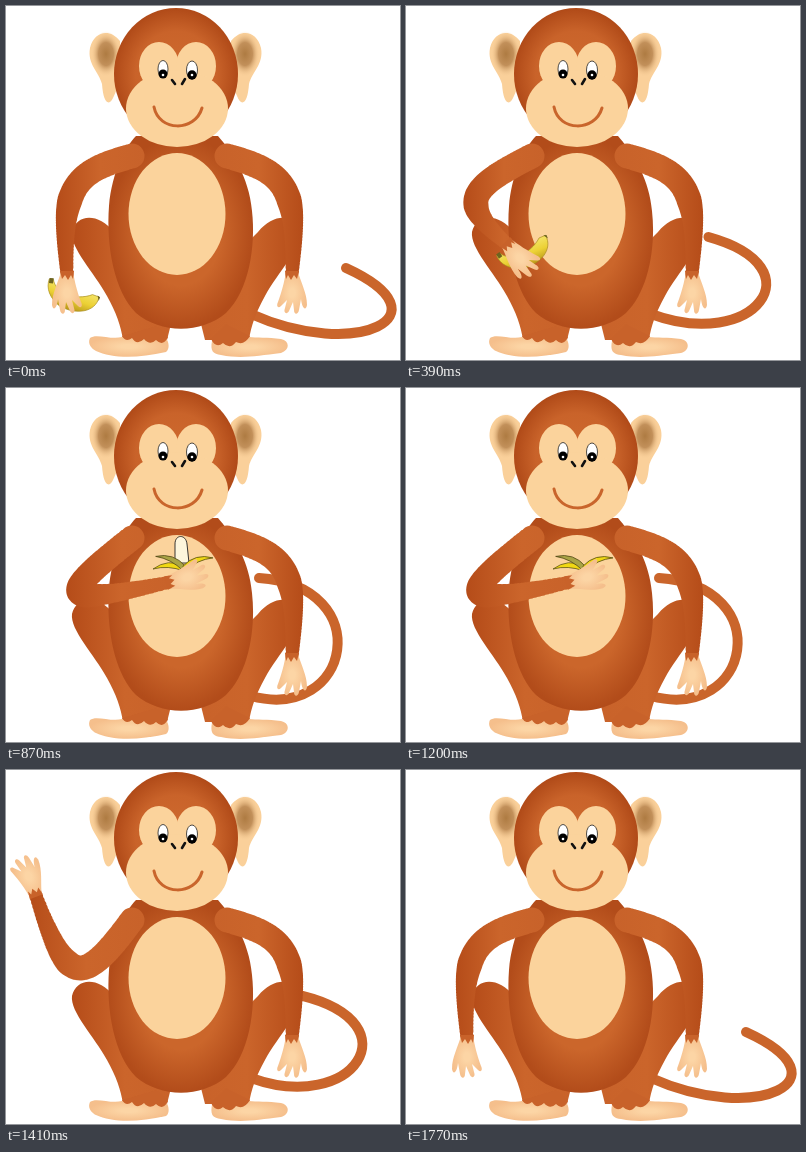
These frames come from a looping animation (394x354 px, 2.04 s). An HTML page:

```html
<!DOCTYPE html>
<html lang="en">
<head>
<meta charset="utf-8">
<title>Monkey with banana</title>
<style>
html, body { margin: 0; width: 100%; height: 100%; overflow: hidden; background: #fff; }
svg { display: block; width: 394px; height: 354px; }
</style>
</head>
<body>
<svg viewBox="0 0 394 354">
  <defs>
    <radialGradient id="fur"><stop offset="0" stop-color="#cf6b2f"/><stop offset=".65" stop-color="#c9632a"/><stop offset="1" stop-color="#b04a18"/></radialGradient>
    <radialGradient id="body"><stop offset=".55" stop-color="#cb662b"/><stop offset="1" stop-color="#b24c1a"/></radialGradient>
    <linearGradient id="limb"><stop offset="0" stop-color="#b54c19"/><stop offset=".5" stop-color="#cb652b"/><stop offset="1" stop-color="#c8622a"/></linearGradient>
    <radialGradient id="skin"><stop offset=".2" stop-color="#fcd5a5"/><stop offset="1" stop-color="#f5bf8c"/></radialGradient>
    <radialGradient id="inner"><stop offset="0" stop-color="#ae7b42"/><stop offset=".5" stop-color="#c2905a"/><stop offset="1" stop-color="#fad09a" stop-opacity="0"/></radialGradient>
    <linearGradient id="yellow" x2="0" y2="1"><stop offset="0" stop-color="#f4e468"/><stop offset=".5" stop-color="#ecd135"/><stop offset="1" stop-color="#b99718"/></linearGradient>
    <g id="ear">
      <path d="M114 35C104 22 88 25 84 42C81 58 93 66 96 78C97 92 100 98 104 96C108 93 109 85 114 78Z" fill="#fad09a"/>
      <ellipse cx="100" cy="48" rx="15" ry="23" fill="url(#inner)"/>
    </g>
    <path id="leg" d="M108 226C92 206 70 208 66 226C64 242 88 266 101 290C110 306 115 320 117 334L161 334L172 290Z" fill="url(#limb)"/>
    <g id="hand">
      <path d="M-6-3C-9 8-15 18-15 30C-14 36-10 34-9 24L-7 35C-6 40-2 40-2 35L-1 27L3 36C5 40 9 38 7 33L5 25L11 31C14 34 16 31 14 27C10 16 8 8 6-3Z" fill="url(#skin)"/>
      <path d="M-7-4L-5 4L-2 0L1 5L4 0L6 4L7-4Z" fill="#c8622a"/>
    </g>
    <path id="flap" d="M0-3Q16-11 31 0Q16-4 0 2Z"/>
  </defs>

  <path id="tail" fill="none" stroke="#ca652b" stroke-width="10" stroke-linecap="round"/>
  <use href="#leg"/>
  <use href="#leg" transform="translate(360) scale(-1 1)"/>
  <path d="M116 331C105 334 90 327 84 332C81 338 86 343 90 345C105 352 130 353 160 346C164 343 163 336 160 332Z" fill="url(#skin)"/>
  <path d="M206 335C204 345 207 348 215 349C235 353 250 350 275 347C284 344 284 335 275 333C262 331 250 332 243 331Z" fill="url(#skin)"/>
  <path d="M116 330Q120 337 126 332Q131 340 138 333Q144 340 150 334Q157 341 162 331L150 320ZM205 333Q210 343 217 337Q224 344 230 336Q238 340 244 330L220 318Z" fill="#c8622a"/>

  <path d="M130 130C120 140 106 165 103 200C100 240 108 285 130 307C155 328 195 328 220 307C243 285 250 240 246 205C243 170 225 145 212 130Z" fill="url(#body)"/>
  <ellipse cx="171" cy="208" rx="48.5" ry="61" fill="#fbd39c"/>
  <g transform="translate(347) scale(-1 1)">
    <path id="stillArm" fill="url(#limb)"/>
    <use href="#hand" id="stillHand"/>
  </g>

  <use href="#ear"/>
  <use href="#ear" transform="translate(339) scale(-1 1)"/>
  <ellipse cx="170" cy="68" rx="62" ry="66" fill="url(#fur)"/>
  <g fill="#fbd39c">
    <ellipse cx="153" cy="60" rx="20" ry="24"/>
    <ellipse cx="190" cy="60" rx="20" ry="24"/>
    <ellipse cx="171" cy="102.5" rx="51" ry="38.5"/>
  </g>
  <g fill="#fff" stroke="#222" stroke-width=".8">
    <ellipse cx="157" cy="63" rx="5" ry="8.5"/>
    <ellipse cx="186" cy="64" rx="5.5" ry="9"/>
  </g>
  <circle cx="157" cy="68" r="4.5"/><circle cx="186" cy="69" r="4.7"/>
  <circle cx="157" cy="69" r="1.3" fill="#fff"/><circle cx="186" cy="69" r="1.3" fill="#fff"/>
  <path d="M166 74L169 78M179 73L176 78" stroke="#111" stroke-width="2.6" stroke-linecap="round"/>
  <path d="M148 101C153 126 189 126 196 102" fill="none" stroke="#c9652c" stroke-width="3" stroke-linecap="round"/>

  <path id="fruit" d="M169 175V156C169 146 180 146 181 156L183 175Z" fill="#fdf6dc" stroke="#222" stroke-width=".9"/>
  <g id="peel" stroke="#4d4512" stroke-width=".7" stroke-linejoin="round">
    <use href="#flap" fill="#f0d813"/>
    <use href="#flap" fill="#a9a446"/>
    <use href="#flap" fill="#f0d813"/>
  </g>
  <path id="arm" fill="url(#limb)"/>
  <g id="grip">
    <g id="banana">
      <path d="M-27-2L-23-3C-17 9 5 10 19-2L26-2C28 14 10 23-8 20C-20 16-27 8-27-2Z" fill="url(#yellow)" stroke="#a58a1c" stroke-width=".6"/>
      <path d="M-27-3L-23-4L-22 1L-26 2ZM24-3L27-2L27 2Z" fill="#6d6420"/>
    </g>
    <use href="#hand"/>
  </g>
</svg>
<script>
const el = id => document.getElementById(id);
const LOOP = 2040, STEP = 30;
const SHOULDER = [126, 150];

// Each pose: where the elbow pulls, where the wrist is, how far the hand is turned
const rest = { elbow: [54, 169], wrist: [61, 269], turn: 0 };
const chest = { elbow: [33, 223], wrist: [164, 194], turn: -106 };
const wave = { elbow: [66, 232], wrist: [29, 123], turn: -201 };
const down = { ...rest, turn: -360 };

const lerp = (a, b, k) => a + (b - a) * k;
const mix = (a, b, k) => a.map((v, i) => lerp(v, b[i], k));
const ramp = (t, from, to) => Math.max(0, Math.min(1, (t - from) / (to - from)));
const smooth = k => (1 - Math.cos(Math.PI * k)) / 2;
const blend = (a, b, k) => ({
  elbow: mix(a.elbow, b.elbow, k), wrist: mix(a.wrist, b.wrist, k), turn: lerp(a.turn, b.turn, k)
});
const move = (node, [x, y], angle = 0, flip = 1) =>
  node.setAttribute('transform', `translate(${x} ${y}) rotate(${angle}) scale(1 ${flip})`);
const show = (node, on) => node.setAttribute('visibility', on ? 'visible' : 'hidden');

function bezier(a, b, c, d, k) {
  const ab = mix(a, b, k), bc = mix(b, c, k), cd = mix(c, d, k);
  return mix(mix(ab, bc, k), mix(bc, cd, k), k);
}

// The arm is a chain of discs along a bent curve, thinner towards the wrist
function armPath({ elbow, wrist }) {
  const c1 = mix(SHOULDER, elbow, .85), c2 = mix(wrist, elbow, .85);
  let d = '';
  for (let k = 0; k <= 1; k += 1 / 64) {
    const [x, y] = bezier(SHOULDER, c1, c2, wrist, k);
    const r = Math.min(12.5, 6.5 + 15 * (1 - k));
    d += `M${x - r} ${y}a${r} ${r} 0 1 1 ${2 * r} 0a${r} ${r} 0 1 1 ${-2 * r} 0`;
  }
  return d;
}

function drawArm(arm, hand, pose) {
  arm.setAttribute('d', armPath(pose));
  move(hand, pose.wrist, pose.turn);
}

function armPose(t) {
  if (t < 1230) return blend(rest, chest, ramp(t, 150, 750));
  if (t < 1410) return blend(chest, wave, ramp(t, 1230, 1410));
  return blend(wave, down, ramp(t, 1410, 1770));
}

function draw(t) {
  const pose = armPose(t);
  drawArm(el('arm'), el('grip'), pose);
  move(el('banana'), mix([7, 15], [12, 5], ramp(t, 150, 750)), 20);
  show(el('banana'), t < 750);

  const curl = t < 1200 ? smooth(ramp(t, 130, 700)) : (1 - ramp(t, 1200, 1770)) ** 1.5;
  const tail = mix([350, 355, 445, 310, 340, 262], [345, 335, 372, 198, 253, 190], curl);
  el('tail').setAttribute('d', `M245 308C${tail}`);

  const open = ramp(t, 720, 870);
  [-180, -156, -21].forEach((angle, i) =>
    move(el('peel').children[i], [178, 181], lerp(-90, angle, open), i < 2 ? -1 : 1));
  move(el('peel'), pose.wrist.map((v, i) => v - chest.wrist[i]));
  show(el('peel'), t >= 750 && t < 1320);

  move(el('fruit'), [0, -48 * ramp(t, 960, 1140)]);
  show(el('fruit'), t >= 750 && t < 1170);
}

drawArm(el('stillArm'), el('stillHand'), rest);
function tick() {
  draw(Math.floor(performance.now() % LOOP / STEP) * STEP);
  requestAnimationFrame(tick);
}
tick();
</script>
</body>
</html>
```
